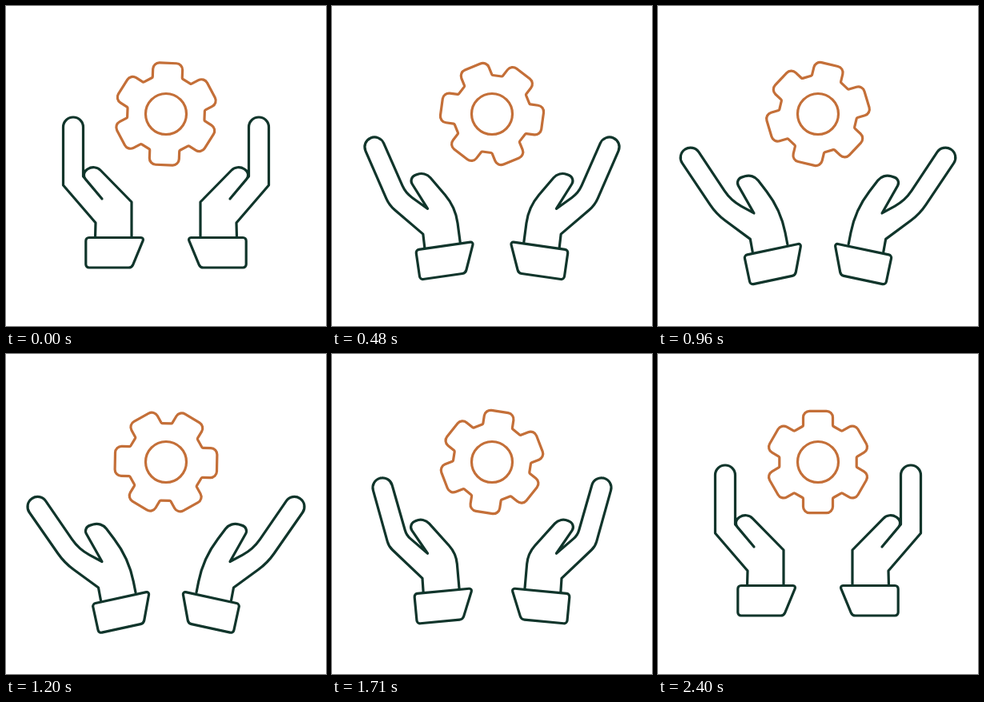
An HTML page for the animation above (2.43 s loop, 400x400 px).

```html
<!DOCTYPE html>
<html lang="en">
<head>
<meta charset="utf-8">
<title>Hands and gear</title>
<style>
html, body { margin: 0; width: 100%; height: 100%; overflow: hidden; background: #fff; }
svg { display: block; width: 100%; height: 100%; }
</style>
</head>
<body>
<svg viewBox="0 0 400 400" fill="none" stroke-width="3.2" stroke-linecap="round" stroke-linejoin="round">
  <g stroke="#c46f38">
    <circle cx="200" cy="135" r="25.5"/>
    <path id="gear"/>
  </g>
  <g stroke="#10352b">
    <g id="left">
      <path id="hand"/>
      <path id="cuff"/>
    </g>
    <use href="#left" transform="matrix(-1 0 0 1 400 0)"/>
  </g>
</svg>
<script>
const LOOP = 2430, STEP = 30;
const OPEN_END = 1230, CLOSE_START = 1365;
const TILT = -12.3, PIVOT = [210, 263], HUB = [200, 135];
const $ = id => document.getElementById(id);
const lerp = (a, b, p) => a + (b - a) * p;

function turn([x, y], deg, [cx, cy]) {
  const a = deg * Math.PI / 180, c = Math.cos(a), s = Math.sin(a);
  return [cx + (x - cx) * c - (y - cy) * s, cy + (x - cx) * s + (y - cy) * c];
}

// A corner of the hand: place and rounding, closed and open
function joint(closed, open, cut = 0, openCut = cut) {
  return { closed, open: turn(open, -TILT, PIVOT), cut, openCut };
}

const joints = {
  wristOut: joint([111.5, 289.5], [118.5, 308]),
  heel: joint([112, 271], [115.5, 292]),
  bend: joint([71.5, 224], [73, 261], 0, 14),
  tipOut: joint([71.5, 139], [22.1, 187.8], 12.4),
  tipIn: joint([96.5, 139], [42.7, 173.6], 12.4),
  knuckle: joint([96.5, 213], [91, 244], 0, 15),
  fork: joint([120, 241], [120, 259.5]),
  thumbIn: joint([93.5, 209.5], [96, 217], 9),
  thumbOut: joint([111, 198], [119, 210], 10.5),
  shoulder: joint([157, 245], [153.4, 255], 0, 30),
  wristIn: joint([157, 289.5], [162, 298])
};

// Line through corners {at, cut}, each rounded by an arc that starts cut before it
function rounded(corners, close) {
  const n = corners.length, fmt = p => p.map(v => v.toFixed(2)).join(' ');
  const d = corners.map(({ at, cut }, i) => {
    if (cut < .05) return fmt(at);
    const toward = k => {
      const q = corners[(k + n) % n].at, dx = q[0] - at[0], dy = q[1] - at[1];
      const len = Math.hypot(dx, dy);
      return [dx / len, dy / len];
    };
    const u = toward(i - 1), v = toward(i + 1);
    const cross = u[0] * v[1] - u[1] * v[0], dot = u[0] * v[0] + u[1] * v[1];
    const r = cut * Math.tan(Math.atan2(Math.abs(cross), dot) / 2);
    const along = w => fmt([at[0] + w[0] * cut, at[1] + w[1] * cut]);
    return `${along(u)}A${r} ${r} 0 0 ${cross < 0 ? 1 : 0} ${along(v)}`;
  });
  return 'M' + d.join('L') + (close ? 'Z' : '');
}

function gearPath() {
  const corners = [];
  const add = (x, y, deg, cut) =>
    corners.push({ at: turn([HUB[0] + x, HUB[1] + y], deg, HUB), cut });
  for (let deg = 0; deg < 360; deg += 60) {
    add(-18.5, -45, deg, 1);
    add(-18.5, -63.7, deg, 8);
    add(18.5, -63.7, deg, 8);
    add(18.5, -45, deg, 1);
  }
  return rounded(corners, true);
}

function handPath(p) {
  return rounded(Object.values(joints).map(j => ({
    at: j.closed.map((v, i) => lerp(v, j.open[i], p)),
    cut: lerp(j.cut, j.openCut, p)
  })));
}

function cuffPath() {
  const top = 289.5, bottom = 327, side = 99.8;
  const corners = [[side, top], [172.8, top], [157.2, bottom], [side, bottom]];
  return rounded(corners.map(at => ({ at, cut: 4 })), true);
}

// cubic-bezier(.25, .1, .25, 1)
function ease(x) {
  if (x <= 0) return 0;
  if (x >= 1) return 1;
  const curve = (u, a, b) => 3 * a * u * (1 - u) ** 2 + 3 * b * u * u * (1 - u) + u ** 3;
  let lo = 0, hi = 1;
  for (let i = 0; i < 30; i++) {
    const mid = (lo + hi) / 2;
    if (curve(mid, .25, .25) < x) lo = mid; else hi = mid;
  }
  return curve(lo, .1, 1);
}

function draw(ms) {
  const t = Math.floor((ms % LOOP) / STEP) * STEP;
  const p = t < CLOSE_START
    ? ease(t / OPEN_END)
    : 1 - ease((t - CLOSE_START) / (LOOP - CLOSE_START));
  $('hand').setAttribute('d', handPath(p));
  $('left').setAttribute('transform', `rotate(${TILT * p} ${PIVOT})`);
  $('gear').setAttribute('transform', `rotate(${180 * (t + STEP) / LOOP} ${HUB})`);
}

$('gear').setAttribute('d', gearPath());
$('cuff').setAttribute('d', cuffPath());
const start = performance.now();
function tick() {
  draw(performance.now() - start);
  requestAnimationFrame(tick);
}
tick();
</script>
</body>
</html>
```
